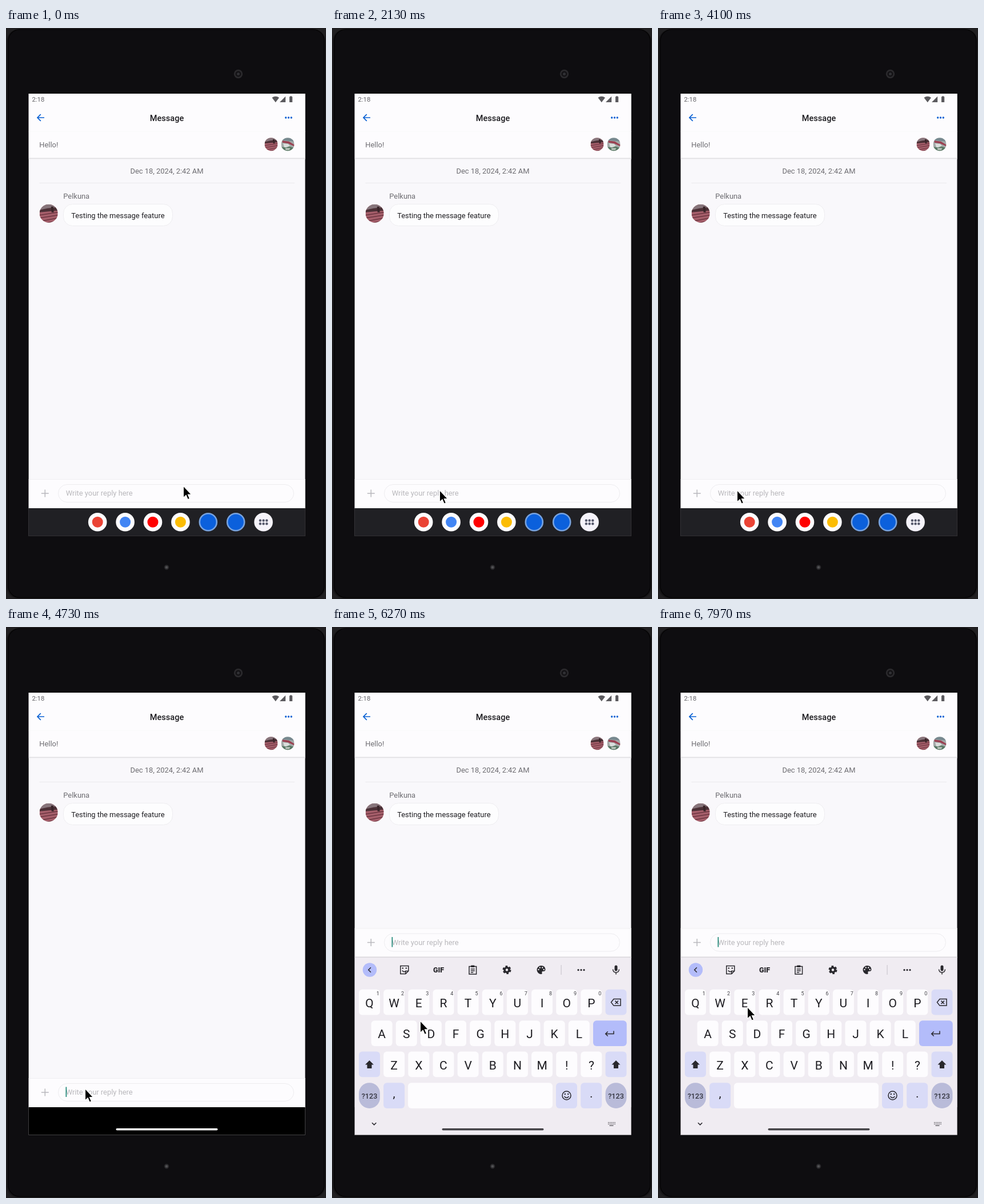
Animation of 560 by 1000 pixels, one loop 8 s. Source, as an HTML page:

```html
<!DOCTYPE html>
<html lang="en">
<head>
<meta charset="utf-8">
<title>Message</title>
<style>
  html, body { margin: 0; width: 100%; height: 100%; overflow: hidden; background: #0e0d10; }
  svg { display: block; width: 560px; height: 1000px; font-family: Roboto, sans-serif; }
  .body { font-size: 12.91px; }
  .grey { fill: #6d6c71; }
  .mid { text-anchor: middle; }
  .ink { fill: none; stroke: #29282d; stroke-width: 1.5; }
  .solid { fill: #29282d; }
  .key { font-size: 21px; fill: #1d1c21; text-anchor: middle; }
  .hint { font-size: 9px; fill: #3f3e44; text-anchor: middle; }
  .num { font-size: 12.6px; font-weight: 500; fill: #33343f; text-anchor: middle; }
</style>
</head>
<body>
<svg viewBox="0 0 560 1000">
  <defs>
    <clipPath id="screenClip"><path d="M39.5 115H523.5V889.5H39.5z"/></clipPath>
    <clipPath id="round"><circle r="16"/></clipPath>
    <radialGradient id="touch">
      <stop offset="0" stop-color="#d9e6e5" stop-opacity=".8"/>
      <stop offset="1" stop-color="#bfe3df" stop-opacity=".8"/>
    </radialGradient>
    <radialGradient id="halo">
      <stop offset=".78" stop-color="#77686c" stop-opacity=".26"/>
      <stop offset="1" stop-color="#77686c" stop-opacity="0"/>
    </radialGradient>
    <g id="field" clip-path="url(#round)">
      <path fill="#a65f6b" d="M-16-16h32v32h-32z"/>
      <path fill="#87757b" d="M-16-16h32v7l-32 5z"/>
      <path fill="#4b3036" d="M-16-6l14-3 18-2v6l-32 3z"/>
      <path fill="none" stroke="#6c3540" stroke-width="1.6" d="M-16 3l32-5M-16 8l32-5M-16 14l32-6M-6 17l22-4"/>
      <path fill="#392529" d="M4-12h4l1 10H5z"/>
    </g>
    <g id="garden" clip-path="url(#round)">
      <path fill="#a3a9a8" d="M-16-16h32v32h-32z"/>
      <path fill="#77898f" d="M-16-16h32v9l-32-3z"/>
      <path fill="#9b4051" d="M-13-9L3-7l13 8v4L1-2l-14-2z"/>
      <path fill="#d9dedb" d="M-11-2l12 1 5 6-14 3z"/>
      <path fill="#587763" d="M-16 6l12 2 8-3 12 4v8h-32z"/>
      <path fill="#b9c3bb" d="M-6 9h12l-2 5h-9z"/>
    </g>
    <g id="shift"><path class="solid" d="M0-7.5L7.5 0H4v6.5h-8V0h-3.5z"/></g>
  </defs>

  <!-- tablet -->
  <path fill="#201f21" d="M0 0h560v1000H0z"/>
  <rect x="1" y="3" width="558" height="996" rx="20" fill="#171618"/>
  <rect x="4" y="2.5" width="553" height="995" rx="20" fill="#0e0d10" stroke="#060506" stroke-width="1.5"/>
  <circle cx="406.5" cy="80.5" r="7.7" fill="#2b2a2d"/>
  <circle cx="406.5" cy="80.5" r="5" fill="#131215"/>
  <circle cx="406.5" cy="80.5" r="2.5" fill="#303034"/>
  <circle cx="281" cy="944.5" r="4.2" fill="#2b2a2d"/>
  <circle cx="281" cy="944.5" r="2.3" fill="#505053"/>

  <g clip-path="url(#screenClip)">
    <path fill="#f9f8fb" d="M39 115h485v775H39z"/>
    <path fill="#fdfcfe" d="M39 115h485v113H39z"/>
    <path fill="#fafafb" d="M39 181h485v1H39z"/>
    <path fill="#e2e1e4" d="M39 227.5h485v1.5H39z"/>
    <path fill="#f1f0f3" d="M39 229h485v1H39z"/>

    <text x="45.5" y="129.4" font-size="11.3" fill="#636267">2:18</text>
    <g fill="#5b5a5e">
      <path d="M465.5 122Q471.700 117.500 478 122L471.750 130.300z"/>
      <path d="M489.200 119.800V130H479z"/>
      <path d="M496 120.300h1.400v-1.100h2.400v1.100h1.400v9.700H496z"/>
    </g>
    <path fill="none" stroke="#0b61d3" stroke-width="1.7" d="M67 157H55.200M60.800 151.200L55 157l5.800 5.800"/>
    <g fill="#0b61d3"><circle cx="489.700" cy="157" r="1.700"/><circle cx="494.500" cy="157" r="1.700"/><circle cx="499.300" cy="157" r="1.700"/></g>
    <text class="mid" x="281.500" y="163" font-size="14.52" font-weight="500" fill="#1d1c20">Message</text>

    <text class="body grey" x="58.300" y="209">Hello!</text>
    <use href="#field" transform="translate(464 203.700) scale(.72)"/>
    <use href="#garden" transform="translate(493 203.700) scale(.72)"/>
    <text class="body grey mid" x="281.500" y="254.600">Dec 18, 2024, 2:42 AM</text>
    <path fill="#ebeaed" d="M58.500 271H505v1H58.500z"/>
    <text class="body grey" x="100.300" y="298.600">Pelkuna</text>
    <use href="#field" transform="translate(74.700 324.700)"/>
    <rect x="100.500" y="308.500" width="191" height="38" rx="16" fill="#fdfdfe" stroke="#eeedf0"/>
    <text class="body" x="114.200" y="333" fill="#1d1c20">Testing the message feature</text>

    <g id="reply">
      <path fill="#fdfcfe" d="M39 790h485v52H39z"/>
      <path fill="#f0eff2" d="M39 790h485v1H39z"/>
      <path stroke="#b9b8bd" stroke-width="1.500" d="M61.800 815h13M68.300 808.500v13"/>
      <rect x="91.500" y="799.500" width="412" height="31" rx="15.500" fill="none" stroke="#edecef"/>
      <text class="body" x="104.700" y="819" fill="#b9b8bc">Write your reply here</text>
      <path id="caret" fill="#208878" d="M104.500 805.500h1.700V823h-1.700z"/>
    </g>

    <path d="M39 841h485v49H39z"/>
    <g id="dock"><path fill="#202024" d="M39 841h485v49H39z"/></g>
    <rect id="handle" x="192.500" y="878" width="178" height="3.600" rx="1.800" fill="#fff"/>
    <g id="keyboard"></g>
  </g>
  <path fill="none" stroke="#3a393c" stroke-opacity=".45" d="M39.500 115V889"/>

  <g id="pinch">
    <path fill="#737373" fill-opacity=".06" d="M0 0h560v1000H0z"/>
    <path stroke="#76dccb" stroke-width="1.800" d="M408.500 225L294.500 471M266.500 532.500L152 778.500"/>
    <circle cx="280.700" cy="501.300" r="29.500" fill="#e6e2e4" fill-opacity=".65" stroke="#cfcdd0" stroke-width="1.800" stroke-dasharray="7.500 4.800"/>
    <circle cx="280.700" cy="501.300" r="19" fill="url(#halo)"/>
    <circle cx="280.700" cy="501.300" r="15.500" fill="#ece9eb"/>
    <circle cx="280.700" cy="501.300" r="13.700" fill="#96e0d5" stroke="#6d9f99" stroke-width="1.600"/>
  </g>
  <path id="pointer" fill="#000" stroke="#fff" stroke-width="1.100" d="M0 0V20.500L4.700 16.200L7.800 23.600L11 22.200L7.900 15H14z"/>
</svg>

<script>
const $ = id => document.getElementById(id);
const LOOP = 8000;

// app tray
const plain = (x, r, fill) => `<circle cx="${x}" cy="865.300" r="${r}" fill="${fill}"/>`;
const trayX = i => 160.200 + 48.400 * i;
let tray = "";
["#ea4335", "#4285f4", "#ff0000", "#fbbc04"].forEach((c, i) => {
  tray += plain(trayX(i), 16.300, "#fdfcfe") + plain(trayX(i), 9.500, c);
});
for (const i of [4, 5]) tray += plain(trayX(i), 16.300, "#78a3df") + plain(trayX(i), 13.700, "#0b60dc");
tray += plain(trayX(6), 16.300, "#f5f3fa");
for (let i = 0; i < 6; i++) {
  tray += `<circle cx="${trayX(6) + (i % 3 - 1) * 5.700}" cy="${i < 3 ? 862.500 : 868.300}" r="2.200" fill="#55586b"/>`;
}
$("dock").innerHTML += tray;

// keyboard
const PALE = "#d9dbf7", WHITE = "#fdfcfe";
const rect = (x, y, w, fill, rx = 6) =>
  `<rect x="${x}" y="${y}" width="${w}" height="44.800" rx="${rx}" fill="${fill}"/>`;
const cap = (x, y, fill, rx) => rect(x - 18.500, y, 37, fill, rx);
const label = (x, y, s, cls = "key") => `<text class="${cls}" x="${x}" y="${y}">${s}</text>`;
const icon = (x, y, art) => `<g transform="translate(${x} ${y})">${art}</g>`;
const line = d => `<path class="ink" d="${d}"/>`;
const dots = (list, r, cls = "solid") =>
  list.map(([x, y]) => `<circle class="${cls}" cx="${x}" cy="${y}" r="${r}"/>`).join("");
const STEP = 43.150, COL = 65.500, ROWS = [634.700, 689.200, 743.500, 798.200];
const row = (letters, x, y) =>
  [...letters].map((c, i) => cap(x + i * STEP, y, WHITE) + label(x + i * STEP, y + 31, c)).join("");

let kb = `<path fill="#f0ecf2" d="M39 578h485v313H39z"/><path fill="#d4d2d6" d="M39 577.500h485v1.300H39z"/>`;
kb += icon(66, 600.500, `<circle r="12.200" fill="#b3bcfa"/>` + line("M2-4.200L-2.200 0L2 4.200"));
kb += icon(126.800, 600.500, line("M-7-7H7V2L2 7H-7zM7 2H2V7M-4 1Q-1 5 2 2") + dots([[-3, -3], [3, -3]], 1.200));
kb += label(186.500, 605, "GIF", "num").replace("<text", `<text style="font-weight:900;font-size:12.500px;fill:#29282d"`);
kb += icon(246.300, 601, line("M-6.300-6.500H6.300V7H-6.300zM-3.500-2H3.500M-3.500 1H3.500M-3.500 4H1") +
  `<path class="solid" d="M-3-8.500H3V-5H-3z"/>`);
kb += icon(306, 600.500, `<circle class="ink" r="4" style="stroke-width:3.600"/>` +
  `<circle class="ink" r="6.200" style="stroke-width:2.600" stroke-dasharray="3.600 2.890"/>`);
kb += icon(366, 600.500, `<path class="solid" d="M0-7.500A7.500 7.500 0 1 0 0 7.500Q2.500 7 1.300 4.500Q1 2.500 3 2.500H5Q7.500 2 7.500-.5Q7-7.500 0-7.500z"/>` +
  `<g fill="#f0ecf2">${[[-4.500, -.5], [-2.200, -4], [2.200, -4], [4.700, -.5]].map(([x, y]) => `<circle cx="${x}" cy="${y}" r="1.200"/>`).join("")}</g>`);
kb += `<path fill="#cbc8ce" d="M400.500 592h1.200v17h-1.200z"/>`;
kb += icon(436, 600.700, dots([[-5, 0], [0, 0], [5, 0]], 1.600));
kb += icon(497, 600, `<rect class="solid" x="-2.500" y="-7.500" width="5" height="10" rx="2.500"/>` +
  line("M-5.500-.5Q-5 5 0 5T5.500-.5M0 5V8.500"));

kb += row("QWERTYUIOP", COL, ROWS[0]);
[..."1234567890"].forEach((c, i) => kb += label(COL + 14.900 + i * STEP, 645, c, "hint"));
kb += cap(497, ROWS[0], PALE) + icon(497, 657.300, line("M-8.500 0L-4-5.800H8V5.800H-4zM-1.500-2.700L4 2.700M4-2.700L-1.500 2.700"));
kb += row("ASDFGHJKL", 87.100, ROWS[1]);
kb += rect(457, ROWS[1], 58.700, "#b3bcfa") + icon(486, 711.500, line("M7-4V1H-7M-3.300-3L-7.300 1L-3.300 5"));
kb += row("ZXCVBNM!?", COL + STEP, ROWS[2]);
for (const x of [COL, 497]) {
  kb += cap(x, ROWS[2], PALE) + `<use href="#shift" x="${x}" y="766.500"/>`;
  kb += cap(x, ROWS[3], "#b9bbd9", 18.500) + label(x, 825.500, "?123", "num");
}
kb += cap(108.600, ROWS[3], PALE) + label(108.600, 824, ",") + rect(133, ROWS[3], 253, WHITE);
kb += cap(410.500, ROWS[3], PALE) + icon(410.500, 820.500,
  `<circle class="ink" r="7.500"/>` + line("M-4 1.500Q0 6.500 4 1.500") + dots([[-2.700, -2.500], [2.700, -2.500]], 1.200));
kb += cap(453.700, ROWS[3], PALE) + label(453.700, 824, ".");
kb += icon(73.700, 870, line("M-3.700-1.800L0 1.900L3.700-1.800"));
for (let i = 0; i < 10; i++) {
  kb += `<path fill="#6b696f" d="M${483 + i % 5 * 2.800} ${867 + (i > 4) * 2.700}h1.600v1.600h-1.600z"/>`;
}
kb += `<path fill="#6b696f" d="M485.500 872.500h7v1.500h-7z"/>`;
kb += `<rect x="192.500" y="878" width="178" height="3.600" rx="1.800" fill="#454348"/>`;
$("keyboard").innerHTML = kb;

// touch points
for (const [x, y] of [[423.300, 193.300], [138, 809.700]]) {
  $("pinch").innerHTML += icon(x, y, `<circle r="36" fill="url(#halo)"/><circle r="29.500" fill="#f5f2f5" fill-opacity=".5"/>` +
    `<circle r="28" fill="url(#touch)" stroke="#5b9993" stroke-width="1.900"/>`);
}

// motion
const PATH = [
  [0, 310.500, 802], [2130, 188.500, 809.500], [3000, 138.500, 809.500], [4300, 138.500, 809.500],
  [4450, 138.500, 808.500], [5880, 138.500, 808.500], [6270, 154.500, 690], [6550, 156.500, 665.500], [LOOP, 156.500, 665.500]
];
const ramp = (t, a, b) => Math.min(1, Math.max(0, (t - a) / (b - a)));
const show = (el, on) => el.setAttribute("visibility", on ? "visible" : "hidden");
const move = (el, x, y) => el.setAttribute("transform", `translate(${x} ${y})`);

const parts = ["reply", "caret", "dock", "handle", "keyboard", "pinch", "pointer"].map($);
const [reply, caret, dock, handle, keyboard, pinch, pointer] = parts;

function draw(t) {
  const i = PATH.findIndex(p => p[0] > t);
  const [t0, x0, y0] = PATH[i - 1], [t1, x1, y1] = PATH[i];
  const k = ramp(t, t0, t1);
  move(pointer, x0 + (x1 - x0) * k, y0 + (y1 - y0) * k);

  const stash = ramp(t, 4420, 4620);
  dock.setAttribute("opacity", 1 - stash);
  handle.setAttribute("opacity", stash);

  const rise = 311 * (1 - (1 - ramp(t, 5480, 5760)) ** 3);
  show(keyboard, rise > 0);
  move(keyboard, 0, 311 - rise);
  move(reply, 0, -Math.max(0, rise - 48.500));

  show(caret, t > 4420 && (t < 6350 || Math.floor((t - 5850) / 500) % 2 === 0));
  show(pinch, t >= 4900 && t < 5480);
}

const start = performance.now();
function tick() {
  draw((performance.now() - start) % LOOP);
  requestAnimationFrame(tick);
}
tick();
</script>
</body>
</html>
```
